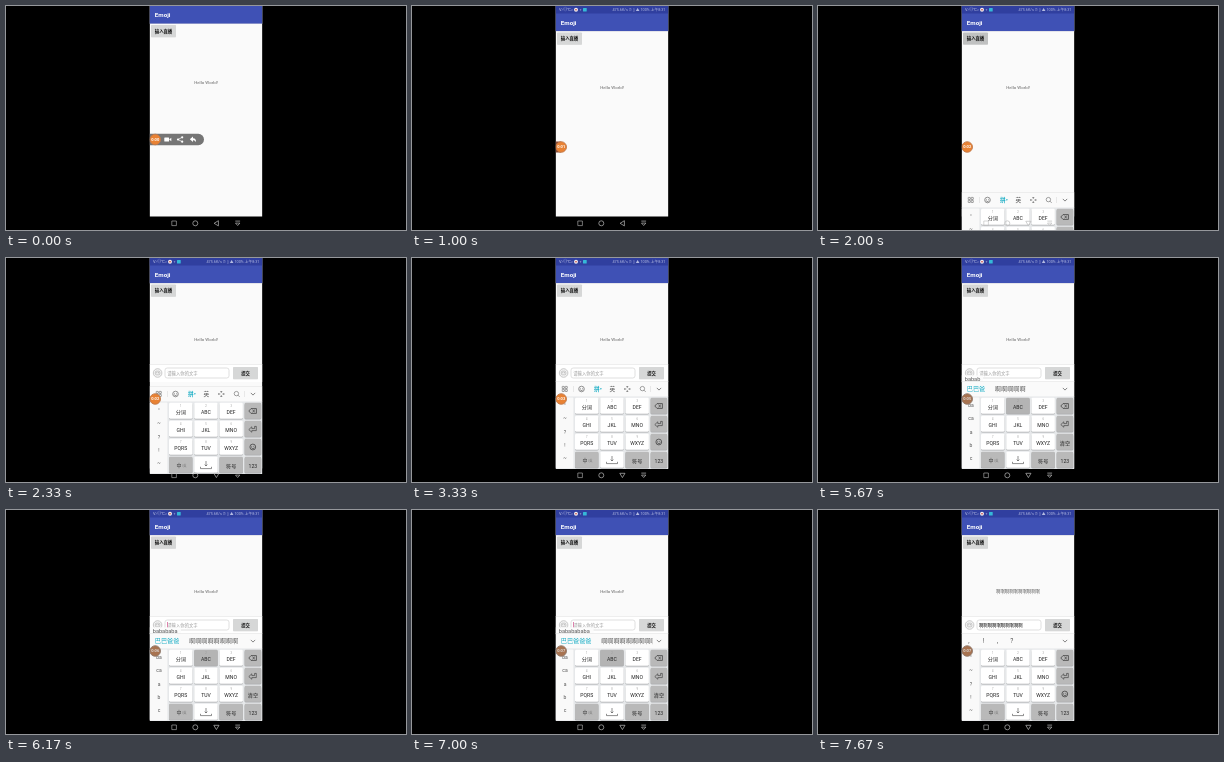
Recreate the animation shown at these times as an HTML page with a canvas. Size 400x224 px, loop 8000 ms.

```html
<!DOCTYPE html>
<html lang="zh">
<head>
<meta charset="utf-8">
<title>Emoji keyboard</title>
<style>
html, body { margin: 0; width: 100%; height: 100%; overflow: hidden; background: #000; }
canvas { display: block; width: 400px; height: 224px; }
</style>
</head>
<body>
<canvas id="stage"></canvas>
<script>
const LOOP = 8000, FPS = 6;
const LEFT = 143.6, WIDTH = 112.8; // the phone screen
const canvas = document.getElementById('stage');
const ratio = window.devicePixelRatio || 1;
canvas.width = 400 * ratio;
canvas.height = 224 * ratio;
const c = canvas.getContext('2d');
const FONT = 'Roboto, "Noto Sans CJK SC", "Noto Sans CJK", sans-serif';
const clamp = v => Math.max(0, Math.min(1, v));
const lerp = (a, b, p) => a + (b - a) * p;

function box(x, y, w, h, fill, r = 0, stroke) {
  c.beginPath();
  c.roundRect(x, y, w, h, r);
  if (fill) { c.fillStyle = fill; c.fill(); }
  if (stroke) { c.strokeStyle = stroke; c.lineWidth = .6; c.stroke(); }
}

const band = (y, h, fill) => box(LEFT, y, WIDTH, h, fill);

function disc(x, y, r, fill, stroke, width = .7) {
  c.beginPath();
  c.arc(x, y, r, 0, 7);
  if (fill) { c.fillStyle = fill; c.fill(); }
  if (stroke) { c.strokeStyle = stroke; c.lineWidth = width; c.stroke(); }
}

function path(d, x, y, color, width = .7, filled) {
  c.save();
  c.translate(x, y);
  const p = new Path2D(d);
  c.lineWidth = width;
  c.strokeStyle = c.fillStyle = color;
  if (filled) c.fill(p); else c.stroke(p);
  c.restore();
}

function text(s, x, y, size, color, align = 'center', weight = 400) {
  c.font = `${weight} ${size}px ${FONT}`;
  c.textAlign = align;
  c.textBaseline = 'alphabetic';
  c.fillStyle = color;
  c.fillText(s, x, y + size * .36);
}

function smile(x, y, r, color) {
  disc(x, y, r, null, color);
  disc(x - r * .35, y - r * .25, .45, color);
  disc(x + r * .35, y - r * .25, .45, color);
  c.beginPath();
  c.arc(x, y, r * .55, .3, 2.84);
  c.stroke();
}

function button(label, x, y, w, fill) {
  box(x, y + .6, w, 12, 'rgba(0,0,0,.1)', .8);
  box(x, y, w, 12, fill, .8);
  text(label, x + w / 2, y + 6, 4.36, '#111', 'center', 700);
}

function statusBar(dy) {
  c.save();
  c.translate(0, dy);
  band(0, 7.5, '#303f9f');
  text('V⁄◎℃⌕', 147, 3.7, 4, '#c5cae9', 'left');
  disc(164, 3.7, 2, '#eee');
  disc(164, 3.7, .8, '#c33');
  text('⌖', 168.5, 3.7, 3.6, '#c5cae9');
  box(171, 1.9, 3.7, 3.7, '#35b8d8', .6);
  text('475.6K/s ⏰ ▯ ▲ 100% 上午8:31', 253.5, 3.7, 3.8, '#b4bbe2', 'right');
  c.restore();
}

function recorder(k) {
  const open = 1 - clamp(k / 3), y = 133.5 + 7.5 * clamp((k - 3) / 3);
  if (open > 0) {
    c.save();
    box(LEFT, y - 5.7, lerp(11, 54.4, open), 11.4, '#757575', [0, 5.7, 5.7, 0]);
    c.clip();
    box(158.3, y - 2, 4.8, 4, '#fff', .6);
    path('M4.8 0L7 -1.8V1.8Z', 158.3, y, '#fff', 1, true);
    path('M2.2 -2.2L-2 0L2.2 2.2', 174, y, '#fff');
    for (const [dx, dy] of [[2.2, -2.2], [-2, 0], [2.2, 2.2]]) disc(174 + dx, y + dy, 1.1, '#fff');
    path('M-3.2 -.3L0 -3V-1.2C2.6 -1.2 3.2 .6 3 2.8C2.2 1.2 1.4 .7 0 .7V2.4Z', 187, y, '#fff', 1, true);
    c.restore();
  }
  if (k >= 6 && k < 12) box(LEFT, y - 5.5, 5.5, 11, '#8a4b33');
  const dim = k >= 24;
  disc(149.2, y, 5.3, dim ? '#a87350' : '#e98233', dim ? '#8f7a6c' : '#c07a4c', .9);
  text('0:0' + Math.floor((k + 1) / 6), 149.2, y, 4, dim ? '#ddd' : '#fff', 'center', 700);
}

function inputBar(k, n) {
  const sent = k >= 43;
  band(106, 18, '#fff');
  band(106, .5, '#ddd');
  disc(151.6, 115, 4.3, '#f4f4f4', '#aaa', .6);
  box(149.4, 113.2, 4.4, 3.6, null, 1, '#aaa');
  disc(150.8, 114.8, .5, '#999');
  disc(152.4, 114.8, .5, '#999');
  box(159, 110, 64, 10, '#fff', 2.2, '#ccc');
  if (sent) text('啊'.repeat(10), 161, 115, 4.36, '#111', 'left', 500);
  else text('请输入你的文字', 161.2, 115, 4.36, '#999', 'left');
  const cursor = sent ? k < 46 : Math.floor((k + 1) / 3) % 2 === 0;
  if (cursor) box(sent ? 205 : 161, 112, .7, 6, '#d0508a');
  button('提交', 227, 109, 25, '#d6d7d7');
  if (n > 1) {
    box(LEFT, 117.3, 3.3 * n + 5, 7, 'rgba(252,252,252,.94)');
    text('ba'.repeat(5).slice(0, n), 146.8, 120.8, 5.6, '#555', 'left');
  }
}

function candidates(k, n) {
  band(123.5, 15, '#fafafa');
  band(123.5, .5, '#e2e2e2');
  path('M-2.2 -1.1L0 1.1L2.2 -1.1', 247, 131, '#666', .8);
  if (k >= 43) {
    [...',!,?'].forEach((s, i) => text(s, 151 + i * 14.3, 131, 6.5, '#555'));
  } else if (n > 1) {
    c.save();
    c.beginPath();
    c.rect(LEFT, 124, 97, 14);
    c.clip();
    const first = '巴巴爸爸爸'.slice(0, Math.ceil(n / 2));
    text(first, 148.8, 131, 6.15, '#16acc4', 'left');
    text('啊'.repeat(n), 158.4 + first.length * 6.15, 131, 6.15, '#555', 'left');
    c.restore();
  } else if (n === 1) {
    for (let i = 0; i < 3; i++) box(149.4, 128.4 + i * 1.9, 4.8, 1.4, '#2fb9d4');
    const x = [166, 178, 188, 197.5, 208.5, 220.5, 233];
    [...'啊abc不吧阿'].forEach((s, i) => text(s, x[i], 131, 6.1, '#555'));
  } else {
    for (let i = 0; i < 4; i++)
      box(150.2 + i % 2 * 3, 128.4 + (i >> 1) * 3, 2.1, 2.1, null, .3, '#666');
    for (const x of [161, 238.5]) box(x, 128, .4, 6, '#ccc');
    smile(169.5, 131, 2.8, '#666');
    text('拼', 184.8, 131, 5.6, '#16acc4', 'center', 700);
    text('▾', 188.8, 131, 3.5, '#16acc4');
    text('英', 200.2, 131, 5.6, '#444');
    path('M-3 0H-1M1 0H3M0 -3V-1M0 1V3M-2 -1L-3 0L-2 1M2 -1L3 0L2 1M-1 -2L0 -3L1 -2M-1 2L0 3L1 2', 215.3, 131, '#666', .6);
    disc(230.4, 130.6, 2.2, null, '#666', .6);
    path('M1.6 1.6L3.2 3.2', 230.4, 130.6, '#666');
  }
}

function keyboard(k, n) {
  band(138, 73, '#e6e8ea');
  const grey = '#b9b9b9';
  const key = (x, row, w, label, fill = '#fff', hint = '') => {
    const y = 139.8 + row * 18;
    box(x, y + .8, w, 16, '#a9acae', 1.3);
    box(x, y, w, 16, fill, 1.3);
    text(label, x + w / 2, y + 9.2, 5.1, '#222');
    if (hint) text(hint, x + w / 2, y + 3, 2.6, '#999');
  };
  box(LEFT, 139.5, 17.8, 70.8, '#f9f9f9', 1);
  const side = n > 1 ? ['ba', 'ca', 'a', 'b', 'c'] : ['°', '~', '?', '!', '~'];
  side.forEach((s, i) => text(s, 153, 147 + i * 13.4, 5, '#555'));
  const pressed = k >= 29 && k < 43 && (k === 29 || (k - 29) % 3 > 0);
  ['分词', 'ABC', 'DEF', 'GHI', 'JKL', 'MNO', 'PQRS', 'TUV', 'WXYZ'].forEach((s, i) =>
    key(163 + i % 3 * 25.2, Math.floor(i / 3), 23.5, s, i === 1 && pressed ? '#b4b4b4' : '#fff', String(i + 1)));
  key(163, 3, 23.5, '', grey);
  text('中', 173, 201.8, 5, '#333');
  text('/英', 178.2, 202.4, 3.2, '#777');
  key(188.2, 3, 23.5, '');
  key(213.4, 3, 23.5, '符号', grey);
  for (let i = 0; i < 4; i++) key(238.6, i, 16.6, i === 3 ? '123' : i === 2 && n > 1 ? '清空' : '', grey);
  path('M-4 0L-1.8 -2.4H3.6V2.4H-1.8ZM-.3 -1.1L2 1.1M2 -1.1L-.3 1.1', 246.8, 148, '#333');
  path('M3.5 -2.6V1.6H-1M3.5 -2.6H1.8V-.4H-1V-2.2L-4 .6L-1 3.2V1.6', 246.8, 166, '#333', .6);
  if (n < 2) smile(246.8, 184, 2.9, '#333');
  path('M-5.5 1.8V3.6H5.5V1.8', 200, 202, '#444', .6);
  path('M0 -4V1M-1.4 -.4L0 1L1.4 -.4', 200, 202, '#444', .6);
}

function navIcons(typing) {
  const col = '#bdbdbd';
  box(165.8, 215, 4.6, 4.6, null, 0, col);
  disc(189.3, 217.3, 2.5, null, col);
  path(typing ? 'M-2.6 -2H2.6L0 2.3Z' : 'M2 -2.6V2.6L-2.3 0Z', 210.4, 217.3, col);
  path('M-2.4 -2.2H2.4M-2.2 -.2H2.2L0 2.2Z', 231.7, 217.3, col);
}

function draw(k) {
  c.setTransform(ratio, 0, 0, ratio, 0, 0);
  box(0, 0, 400, 224, '#000');
  c.save();
  c.beginPath();
  c.rect(LEFT, 0, WIDTH, 224);
  c.clip();

  const drop = clamp((k - 3) / 3), top = 7.5 * drop;
  const n = k >= 30 && k < 43 ? Math.min(10, k - 29) : 0;
  band(0, 210.6, '#fafafa');
  band(0, 18 + top, '#cfd0dc');
  band(0, 17.5 + top, '#3f51b5');
  text('Emoji', 148.8, 8.9 + top, 6.2, '#fff', 'left', 700);
  statusBar(top - 7.5);
  button('输入直播', 145, 19 + top, 25, k >= 10 && k < 14 ? '#c0c1c1' : '#d6d7d7');
  text(k >= 43 ? '啊'.repeat(10) : 'Hello World!', 200, 76.8 + 5 * drop, 4.4, '#666');

  if (k >= 12) {
    const slide = [63, 22, 5][k - 12] || 0;
    if (k >= 14) inputBar(k, n);
    c.save();
    c.translate(0, slide);
    keyboard(k, n);
    candidates(k, n);
    c.restore();
  }
  recorder(k);
  navIcons(k >= 12);
  c.restore();
}

const start = performance.now();
function tick() {
  const t = (performance.now() - start) % LOOP;
  draw(Math.floor((t + 4) * FPS / 1000) % (LOOP * FPS / 1000));
  requestAnimationFrame(tick);
}
tick();
</script>
</body>
</html>
```
